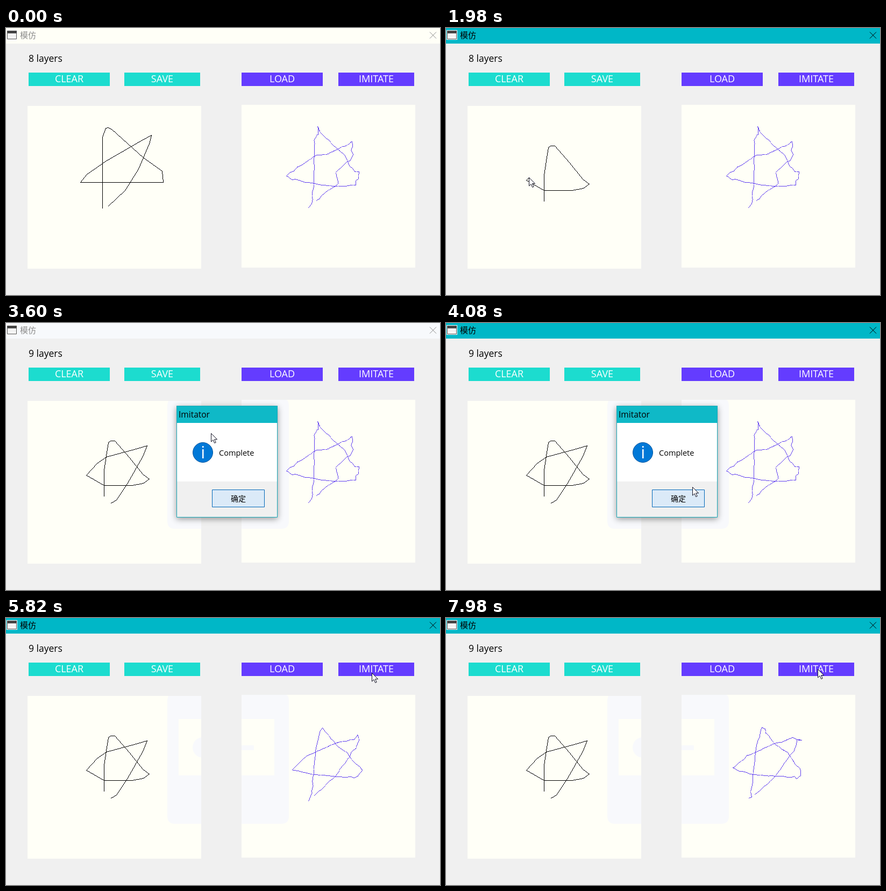
These frames come from a looping animation (807 px wide and 497 px high, 8 s). An HTML page with a canvas:

```html
<!DOCTYPE html>
<html lang="zh">
<head>
<meta charset="utf-8">
<style>
html, body { margin: 0; width: 100%; height: 100%; overflow: hidden; background: #f0f0f0; }
svg, canvas { position: absolute; left: 0; top: 0; }
svg { font-family: "Open Sans", "Noto Sans CJK SC", "Noto Sans CJK", sans-serif; }
.label { fill: #fff; font-size: 18px; text-anchor: middle; }
</style>
</head>
<body>
<svg width="807" height="497">
  <defs>
    <clipPath id="papers"><path d="M40 145h323v303h-323zM438 143h323v303h-323z"/></clipPath>
  </defs>
  <rect id="bar" width="807" height="29"/>
  <path fill="#fff" d="M1 4h20v18h-20z"/>
  <path fill="#f4f4f4" stroke="#555" d="M2.5 5.5h17v15h-17z"/>
  <path fill="#444" d="M2 5h18v5h-18z"/>
  <text id="title" x="26" y="19" font-size="15">模仿</text>
  <path id="close" fill="none" d="M788 7.5l12 12m0-12l-12 12"/>
  <text id="count" x="42" y="63" font-size="17.5"></text>
  <g id="buttons"></g>
  <g clip-path="url(#papers)">
    <rect width="807" height="497" fill="#fffff7"/>
    <g id="halo" fill="#f8f9fc">
      <path fill-rule="evenodd" d="M314 140h198q14 0 14 14v215q0 14-14 14h-198q-14 0-14-14v-215q0-14 14-14zM321 188v105h178v-105z"/>
      <circle cx="366" cy="241" r="19"/>
      <path d="M438 237h23v9h-23z"/>
    </g>
  </g>
</svg>

<canvas id="ink" width="807" height="497"></canvas>

<svg width="807" height="497">
  <filter id="shadow" x="-20%" y="-20%" width="140%" height="140%">
    <feDropShadow dx="0" dy="3" stdDeviation="6" flood-opacity=".4"/>
  </filter>
  <g id="dialog">
    <path fill="#f0f0f0" filter="url(#shadow)" d="M317 154h188v208h-188z"/>
    <path fill="#fff" d="M318 186h186v109h-186z"/>
    <path fill="#0fb9c7" d="M317 154h188v32h-188z"/>
    <path fill="none" stroke="#17a9b8" d="M317.5 154.5h187v207h-187z"/>
    <text x="321" y="176" font-size="15.5">Imitator</text>
    <circle cx="366" cy="241" r="18.5" fill="#0078d7" stroke="#00549c"/>
    <path fill="#fff" d="M365 229h2.5v3h-2.5zM365 235h2.5v17h-2.5z"/>
    <text x="396" y="247" font-size="14.5">Complete</text>
    <path fill="#dbeaf8" stroke="#0067b8" d="M383.5 310.5h97v32h-97z"/>
    <text x="432" y="332" font-size="14" text-anchor="middle">确定</text>
  </g>
  <path id="cursor" fill="#fff" stroke="#112" d="M.5 .5v15.5l3.6-3.4 2.6 5.9 2.5-1.1-2.6-5.7h5z"/>
</svg>

<script>
const $ = id => document.getElementById(id);
const ink = $('ink').getContext('2d');
const LOOP = 8000, TICK = 60;
const DRAW_START = 1200, DRAW_END = 2540;

for (const [name, x, w, color] of [
  ['CLEAR', 42, 151, '#1cdccf'], ['SAVE', 220, 141, '#1cdccf'],
  ['LOAD', 438, 151, '#643cff'], ['IMITATE', 618, 141, '#643cff'],
]) {
  $('buttons').innerHTML += `<rect x="${x}" y="83" width="${w}" height="25" fill="${color}"/>
    <text class="label" x="${x + w / 2}" y="101">${name}</text>`;
}

const parse = text => text.split(' ').map(pair => pair.split(',').map(Number));
const mix = (a, b, f) => a.map((v, i) => v + (b[i] - v) * f);

// Walks a polyline in equal steps, calling span() for the number of steps in each edge
function walk(points, span) {
  const out = [points[0]];
  for (let i = 1; i < points.length; i++) {
    const [a, b] = [points[i - 1], points[i]];
    const n = Math.max(1, Math.round(span(Math.abs(b[0] - a[0]), Math.abs(b[1] - a[1]))));
    for (let k = 1; k <= n; k++) out.push(mix(a, b, k / n));
  }
  return out;
}

// One-pixel aliased line as a list of pixels
const pixels = points => walk(points, Math.max).map(p => p.map(Math.round));

// Shaky imitation of an outline: the jitter grows steeply towards the tips
function imitate(outline, seed) {
  const random = () => (seed = seed * 16807 % 2147483647) / 2147483647 - .5;
  const shaky = walk(outline, (dx, dy) => Math.hypot(dx, dy) / 7).map(([x, y]) => {
    const amount = 1 + 9 * (Math.hypot(x - 592, y - 266) / 75) ** 4;
    return [x + random() * amount, y + random() * amount];
  });
  return pixels(shaky);
}

const oldStar = pixels(parse('179,335 179,203 185,186 190,185 196,188 255,241 290,266 292,287 ' +
  '138,287 150,272 186,247 250,210 270,199 266,215 246,262 221,302 190,331'));
const newStar = pixels(parse('182,322 182,274 186,247 190,222 194,219 202,219 229,250 254,281 ' +
  '266,290 255,298 234,302 182,302 149,283 169,261 186,249 238,235 262,228 254,248 225,299 ' +
  '205,329 195,335'));
const eightLayers = parse('566,333 572,290 573,209 580,188 609,219 631,237 637,256 655,270 ' +
  '648,292 610,295 551,286 516,276 548,255 577,236 598,234 643,213 645,240 613,268 617,290 ' +
  '587,310 576,322');
const nineLayers = parse('567,339 571,290 576,240 587,203 613,235 634,250 659,284 655,297 ' +
  '571,291 531,281 560,256 609,234 656,221 649,242 634,263 612,294 575,328');

const firstCopy = imitate(eightLayers, 4711);
const copies = [5100, 5700, 6000, 6540, 6840, 7740, 7980]
  .map((time, i) => ({ time, dots: imitate(nineLayers, 8150 + 977 * i) }));

// Stops of the pointer: time, x, y
const stops = [
  [60, 230, 0], [840, 138, 99], [960, 174, 161], [1020, 224, 288], [DRAW_START, 182, 322],
  [DRAW_END, 195, 335], [3060, 284, 97], [3360, 305, 105], [3840, 457, 305], [4200, 458, 305],
  [4740, 674, 98], [5280, 674, 98], [5760, 680, 102], [7020, 687, 103], [7980, 691, 95],
];

function pointerAt(t) {
  const i = Math.max(1, stops.findIndex(stop => stop[0] >= t));
  const [a, b] = [stops[i - 1], stops[i]];
  return mix(a, b, (t - a[0]) / (b[0] - a[0])).slice(1);
}

function plot(dots, color) {
  ink.fillStyle = color;
  for (const [x, y] of dots) ink.fillRect(x, y, 1, 1);
}

const show = (id, on) => $(id).style.display = on ? '' : 'none';

function render(t) {
  const active = t >= 540 && t < 3360 || t >= 4080;
  $('bar').setAttribute('fill', active ? '#00b7c7' : t < 540 ? '#fffff7' : '#f7f9fc');
  $('title').setAttribute('fill', active ? '#000' : '#8c8c8c');
  $('close').setAttribute('stroke', active ? '#000' : '#8c8c8c');
  $('count').textContent = (t < 3360 ? 8 : 9) + ' layers';

  show('halo', t >= 3480);
  show('dialog', t >= 3420 && t < 4200);
  $('dialog').style.opacity = t === 3420 || t === 4140 ? .5 : 1;
  show('cursor', t >= 60);

  const drawn = Math.min(1, Math.max(0, (t - DRAW_START) / (DRAW_END - DRAW_START)));
  const stroke = newStar.slice(0, Math.round(drawn * newStar.length));
  ink.clearRect(0, 0, 807, 497);
  plot(t < 660 ? oldStar : stroke, '#000');
  plot(copies.findLast(copy => copy.time <= t)?.dots ?? firstCopy, '#5f3ef0');

  const [x, y] = drawn > 0 && drawn < 1 ? stroke.at(-1) : pointerAt(t);
  $('cursor').setAttribute('transform', `translate(${Math.round(x)} ${Math.round(y)})`);
}

const start = performance.now();
function frame() {
  const t = (performance.now() - start) % LOOP;
  render(Math.floor(t / TICK) * TICK);
  requestAnimationFrame(frame);
}
frame();
</script>
</body>
</html>
```
